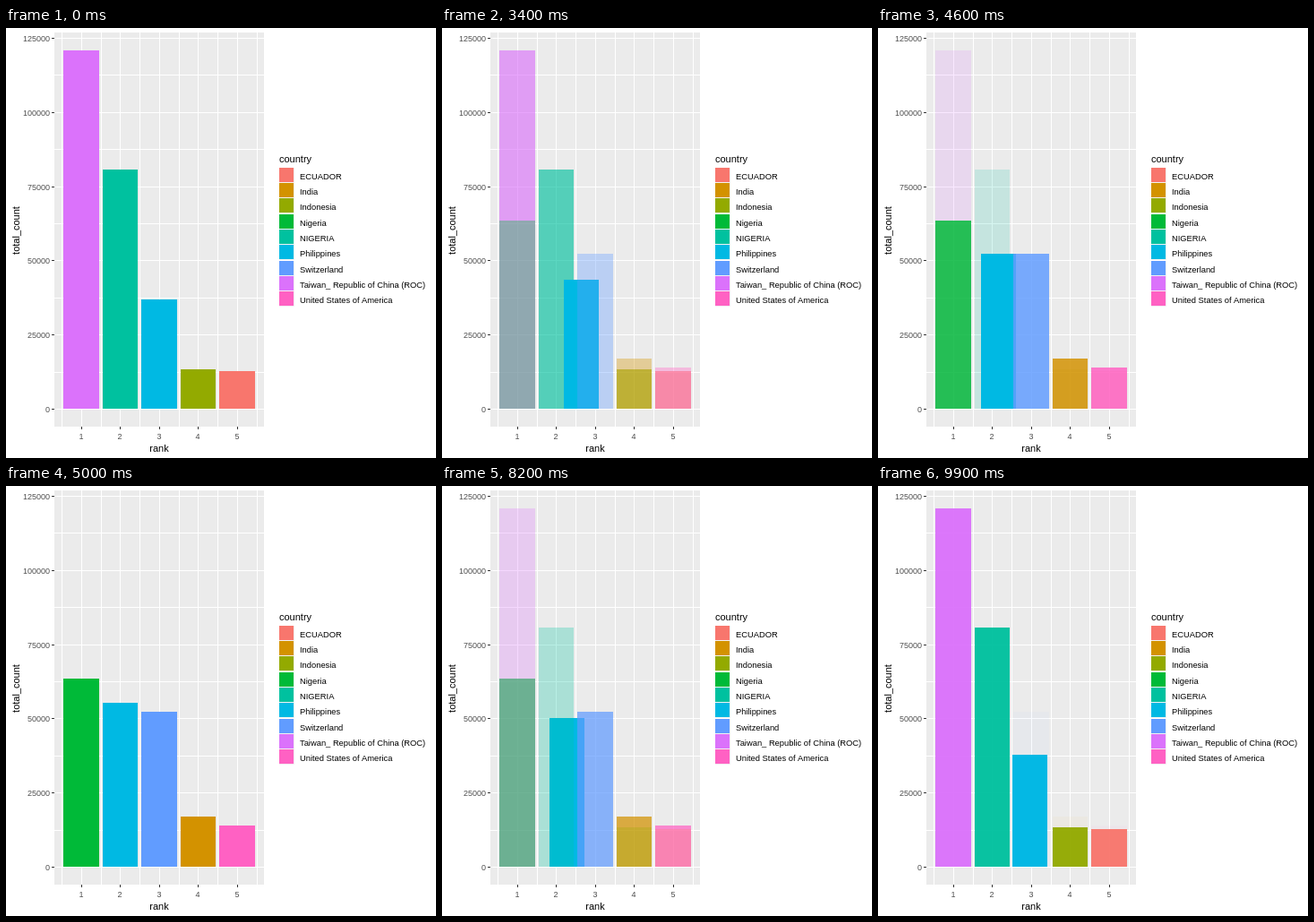
Animation, 480 px wide and 480 px high, one loop 10 s. Source, as an HTML page with a canvas:

```html
<!DOCTYPE html>
<html lang="en">
<head>
<meta charset="utf-8">
<title>Ranked counts by country</title>
<style>
  html, body { margin: 0; width: 100%; height: 100%; overflow: hidden; background: #fff; }
  canvas { display: block; }
</style>
</head>
<body>
<canvas id="chart" width="480" height="480"></canvas>
<script>
const ctx = document.getElementById('chart').getContext('2d');

const COUNTRIES = {
  'ECUADOR': '#F8766D',
  'India': '#D39200',
  'Indonesia': '#93AA00',
  'Nigeria': '#00BA38',
  'NIGERIA': '#00C19F',
  'Philippines': '#00B9E3',
  'Switzerland': '#619CFF',
  'Taiwan_ Republic of China (ROC)': '#DB72FB',
  'United States of America': '#FF61C3'
};

// Each ranking lists [country, y of the bar's top edge] from rank 1 to 5.
const RANKINGS = [
  [['Taiwan_ Republic of China (ROC)', 25], ['NIGERIA', 158], ['Philippines', 302.6],
   ['Indonesia', 381], ['ECUADOR', 383]],
  [['Nigeria', 215], ['Philippines', 242], ['Switzerland', 252],
   ['India', 369], ['United States of America', 379]]
].map(rows => rows.map(([name, top], i) => ({ name, top, rank: i + 1 })));

const PANEL = { left: 54, top: 5, right: 288, bottom: 445 };
const BASE = 425, UNIT = 43.5, BAR = 39.15, PER_25K = 82.78;
const FRAME = 100, HALF = 5000, HOLD = 2500, STEPS = 25;

const rankX = rank => 83.975 + (rank - 1) * UNIT;
const countY = count => BASE - count / 25000 * PER_25K;
const mix = (a, b, p) => a + (b - a) * p;

function rect(color, x, y, w, h) {
  ctx.fillStyle = color;
  ctx.fillRect(x, y, w, h);
}

function label(text, x, y, size, color = '#000', align = 'left') {
  ctx.font = `${size}px "Liberation Sans", Arial, sans-serif`;
  ctx.fillStyle = color;
  ctx.textAlign = align;
  ctx.fillText(text, x, y);
}

function drawGrid() {
  const { left, top, right, bottom } = PANEL;
  rect('#EBEBEB', left, top, right - left, bottom - top);
  for (let rank = 0.5; rank <= 5.5; rank += 0.5)
    rect('#fff', Math.round(rankX(rank)), top, 1, bottom - top);
  for (let count = 0; count <= 125000; count += 12500)
    rect('#fff', left, Math.round(countY(count)), right - left, 1);
}

function drawAxes() {
  for (let count = 0; count <= 125000; count += 25000) {
    const y = Math.round(countY(count));
    rect('#333', PANEL.left - 3, y, 3, 1);
    label(count, 49, y + 4, 9, '#4D4D4D', 'right');
  }
  for (let rank = 1; rank <= 5; rank++) {
    const x = Math.round(rankX(rank));
    rect('#333', x, PANEL.bottom, 1, 3);
    label(rank, x, 459, 9, '#4D4D4D', 'center');
  }
  label('rank', 171, 473, 11, '#000', 'center');
  ctx.save();
  ctx.translate(15, 226);
  ctx.rotate(-Math.PI / 2);
  label('total_count', 0, 0, 11, '#000', 'center');
  ctx.restore();
}

function drawLegend() {
  label('country', 305, 150, 11);
  Object.entries(COUNTRIES).forEach(([name, color], i) => {
    const y = Math.round(155.9 + i * 17.28);
    rect('#F2F2F2', 305, y, 17, 17);
    rect(color, 305, y, 16, 16);
    label(name, 328, y + 13, 9.35);
  });
}

function drawBar({ name, rank, top }, alpha) {
  const left = Math.round(rankX(rank) - BAR / 2);
  const right = Math.round(rankX(rank) + BAR / 2);
  const y = Math.round(top);
  ctx.globalAlpha = alpha;
  rect(COUNTRIES[name], left, y, right - left, BASE - y);
  ctx.globalAlpha = 1;
}

// Shared countries slide, the others fade; newcomers are painted last.
function drawBars(from, to, p) {
  const find = (rows, name) => rows.find(row => row.name === name);
  for (const bar of from) {
    const next = find(to, bar.name);
    if (next) {
      drawBar({
        name: bar.name,
        rank: mix(bar.rank, next.rank, p),
        top: mix(bar.top, next.top, p)
      }, 1);
    } else {
      drawBar(bar, 1 - p);
    }
  }
  for (const bar of to)
    if (!find(from, bar.name)) drawBar(bar, p);
}

function draw(time) {
  const t = time % (2 * HALF);
  const half = Math.floor(t / HALF);
  const step = Math.max(0, Math.floor((t % HALF - HOLD) / FRAME));
  rect('#fff', 0, 0, 480, 480);
  drawGrid();
  drawBars(RANKINGS[half], RANKINGS[1 - half], step / STEPS);
  drawAxes();
  drawLegend();
}

function tick() {
  draw(performance.now());
  requestAnimationFrame(tick);
}
tick();
</script>
</body>
</html>
```
